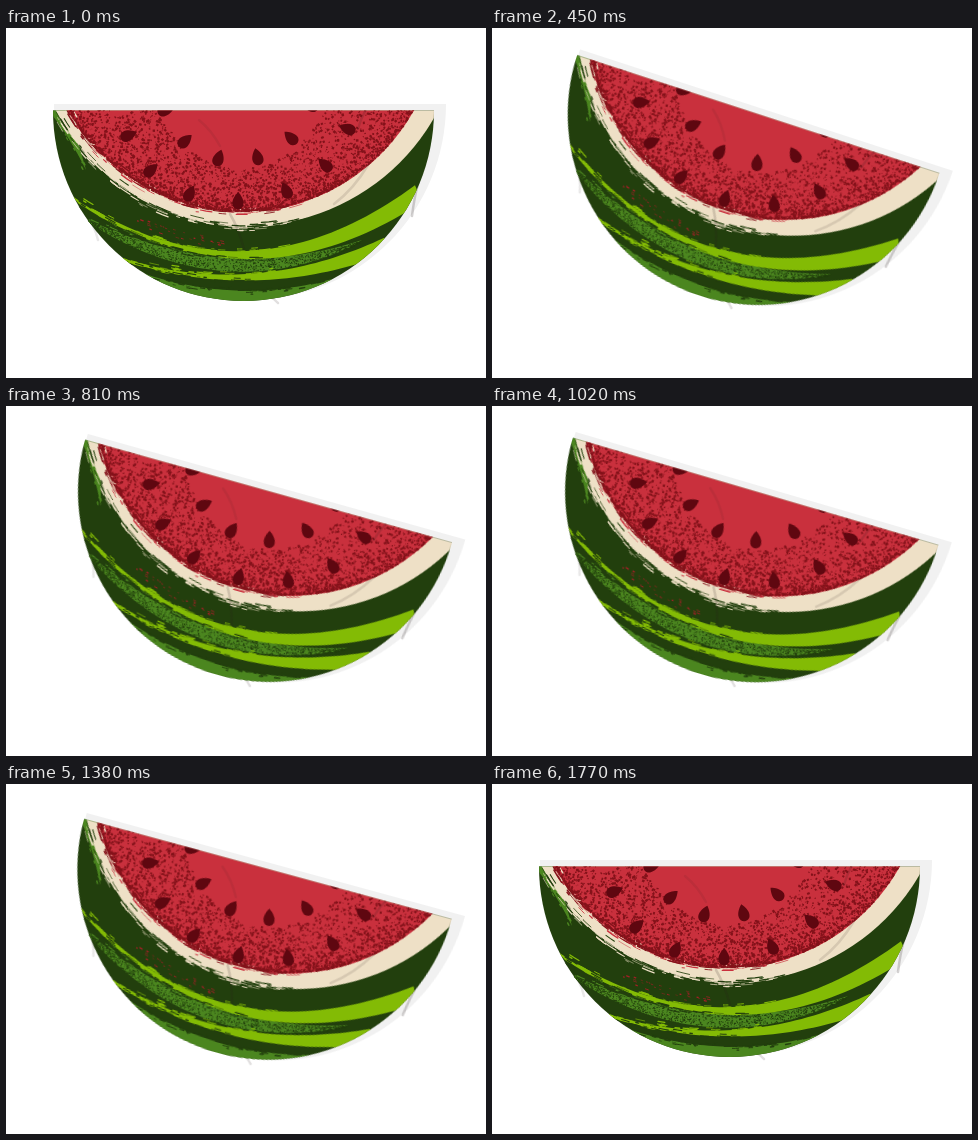
An HTML page with a canvas that plays this animation: 480 px wide and 350 px high, repeating every 1.8 s.

```html
<!DOCTYPE html>
<html>
<head>
<meta charset="utf-8">
<style>
html, body { margin: 0; width: 100%; height: 100%; overflow: hidden; background: #fff; }
canvas { display: block; transform-origin: 240px 175px; }
</style>
</head>
<body>
<canvas id="melon" width="480" height="350"></canvas>
<script>
const canvas = document.getElementById('melon');
const g = canvas.getContext('2d');
const RED = '#c9303d', SPECK = '#84121a', SEED = '#5f0710', CREAM = '#eee0c6';
const DARK = '#223f0d', MID = '#4b861f', LIME = '#83bb05';
const CX = 237.5, TOP = 82.5, R = 190.5;

let seed = 7;
function rnd(a = 0, b = 1) {
  seed = (seed * 16807) % 2147483647;
  return a + (b - a) * seed / 2147483647;
}

// Curves are functions of t in 0..1, from left to right
const arc = (cx, cy, r) => t => {
  const a = (152 - 124 * t) * Math.PI / 180;
  return [cx + r * Math.cos(a), cy + r * Math.sin(a)];
};
const sag = (x0, y0, x1, y1, low) => t => [
  x0 + (x1 - x0) * t,
  y0 + (y1 - y0) * t + 4 * t * (1 - t) * (low - (y0 + y1) / 2)
];
const lower = (curve, depth) => t => {
  const [x, y] = curve(t);
  return [x, y + depth(t)];
};

function disc(x, y, r, color) {
  g.fillStyle = color;
  g.beginPath();
  g.arc(x, y, r, 0, 7);
  g.fill();
}

function band(top, bottom, color) {
  g.fillStyle = color;
  g.beginPath();
  for (let t = 0; t <= 1; t += 0.02) g.lineTo(...top(t));
  for (let t = 1; t >= 0; t -= 0.02) g.lineTo(...bottom(t));
  g.fill();
}

// Dry-brush strokes along a curve, denser and wilder towards the left
function brush(curve, t1, n, spread, color) {
  g.strokeStyle = color;
  for (let i = 0; i < n; i++) {
    const t = rnd(0, t1), d = rnd(0.005, 0.035), off = rnd(-1, 1) * rnd(0, spread);
    g.lineWidth = rnd(0.4, 1.5);
    g.beginPath();
    for (let k = 0; k < 3; k++) {
      const [x, y] = curve(t + d * k / 2);
      g.lineTo(x - off * 0.5, y + off);
    }
    g.stroke();
  }
}

function fold(x, y, dx, dy, alpha) {
  g.strokeStyle = `rgba(40,30,30,${alpha})`;
  g.lineWidth = 2.5;
  g.beginPath();
  g.moveTo(x, y);
  g.quadraticCurveTo(x + dx * 0.6, y + dy * 0.4, x + dx, y + dy);
  g.stroke();
}

function drawBacking() {
  g.fillStyle = '#f1f1f1';
  g.beginPath();
  g.arc(244, 76, 196, 0, Math.PI);
  g.fill();
  g.lineCap = 'round';
  fold(87, 198, 5, 14, 0.1);
  fold(263, 268, 9, 7, 0.14);
  fold(412, 156, -6, 32, 0.2);
}

function drawStripe(top, width) {
  const bottom = lower(top, t => width * (0.15 + 0.85 * t * t));
  band(top, bottom, LIME);
  brush(top, 0.6, 50, 5, LIME);
  brush(bottom, 0.55, 45, 4, DARK);
}

function drawGrain(top) {
  const thick = t => 14 * Math.sin(Math.PI * t) ** 0.7;
  band(top, lower(top, thick), MID);
  brush(top, 0.45, 60, 9, MID);
  for (let i = 0; i < 1100; i++) {
    const t = rnd(), [x, y] = top(t);
    g.fillStyle = DARK;
    g.fillRect(x, y + thick(t) * rnd(), rnd(0.5, 1.5), rnd(0.5, 1.4));
  }
}

function drawRind() {
  g.fillStyle = DARK;
  g.fillRect(40, 80, 400, 200);
  const wedge = sag(42, 82, 80, 142, 108);
  band(wedge, lower(wedge, t => -60 * (1 - t)), MID);
  brush(wedge, 1, 25, 4, MID);
  drawGrain(sag(78, 190, 356, 212, 229));
  drawStripe(sag(66, 168, 416, 152, 223), 22);
  drawStripe(sag(98, 224, 384, 207, 246), 18);
  const base = sag(112, 236, 330, 250, 262);
  band(base, lower(base, () => 40), MID);
  brush(base, 0.95, 70, 5, DARK);
}

function drawSpecks() {
  g.fillStyle = SPECK;
  for (let i = 0; i < 3600; i++) {
    const t = rnd(), depth = 42 + 36 * Math.cos(Math.PI * t) ** 2;
    const [x, y] = arc(235, -14, 197 - depth * rnd() ** 2.2)(t);
    const s = rnd(0.7, 2.5);
    g.save();
    g.translate(x, y);
    g.rotate(rnd(0, 3));
    g.fillRect(-s / 2, -s / 2, s, s * rnd(0.6, 1.2));
    g.restore();
  }
}

function drawFlesh() {
  const rind = arc(241, -18, 216), edge = arc(235, -14, 198);
  disc(241, -18, 216, CREAM);
  brush(rind, 0.6, 150, 6, CREAM);
  brush(rind, 0.6, 40, 5, DARK);
  disc(235, -14, 198, RED);
  brush(edge, 0.62, 90, 5, RED);
  brush(edge, 0.55, 40, 5, CREAM);
  brush(edge, 0.6, 60, 5, SPECK);
  brush(sag(130, 190, 220, 218, 206), 0.95, 32, 7, '#a31f26');
  drawSpecks();
}

function drawSeed(x, y) {
  g.save();
  g.translate(x, y);
  g.rotate(Math.atan2(235 - x, y - 62));
  g.fillStyle = SEED;
  g.beginPath();
  g.moveTo(0, -9);
  g.bezierCurveTo(3, -6, 6, -1, 5.5, 3);
  g.bezierCurveTo(5, 10, -5, 10, -5.5, 3);
  g.bezierCurveTo(-6, -1, -3, -6, 0, -9);
  g.fill();
  g.restore();
}

// A row of seeds, evenly spread on a slightly tilted ellipse
function seedRow(n, step, rx, cy, ry) {
  for (let i = 0; i < n; i++) {
    const a = (i - (n - 1) / 2) * step * Math.PI / 180;
    const dx = rx * Math.sin(a);
    drawSeed(232 + dx, cy + ry * Math.cos(a) - 0.03 * dx);
  }
}

function drawMelon() {
  drawBacking();
  g.save();
  g.beginPath();
  g.arc(CX, TOP, R, 0, Math.PI);
  g.clip();
  drawRind();
  drawFlesh();
  seedRow(7, 25.3, 113, 82, 91);
  seedRow(6, 30, 75, 62, 70);
  fold(224, 186, 14, 35, 0.16);
  fold(328, 176, 34, -39, 0.12);
  fold(361, 80, -9, 21, 0.16);
  fold(193, 92, 21, 26, 0.08);
  g.restore();
}

const smooth = x => {
  const u = Math.min(1, Math.max(0, x));
  return u * u * (3 - 2 * u);
};

// Tilt to 20 degrees, sink to 15, then the same backwards
function angle(ms) {
  const mid = 894, t = mid - Math.abs(ms - mid);
  return 20 * smooth((t - 164) / 356) - 5 * smooth((t - 520) / (mid - 520));
}

function frame() {
  canvas.style.transform = `rotate(${angle(performance.now() % 1800)}deg)`;
  requestAnimationFrame(frame);
}

drawMelon();
frame();
</script>
</body>
</html>
```
